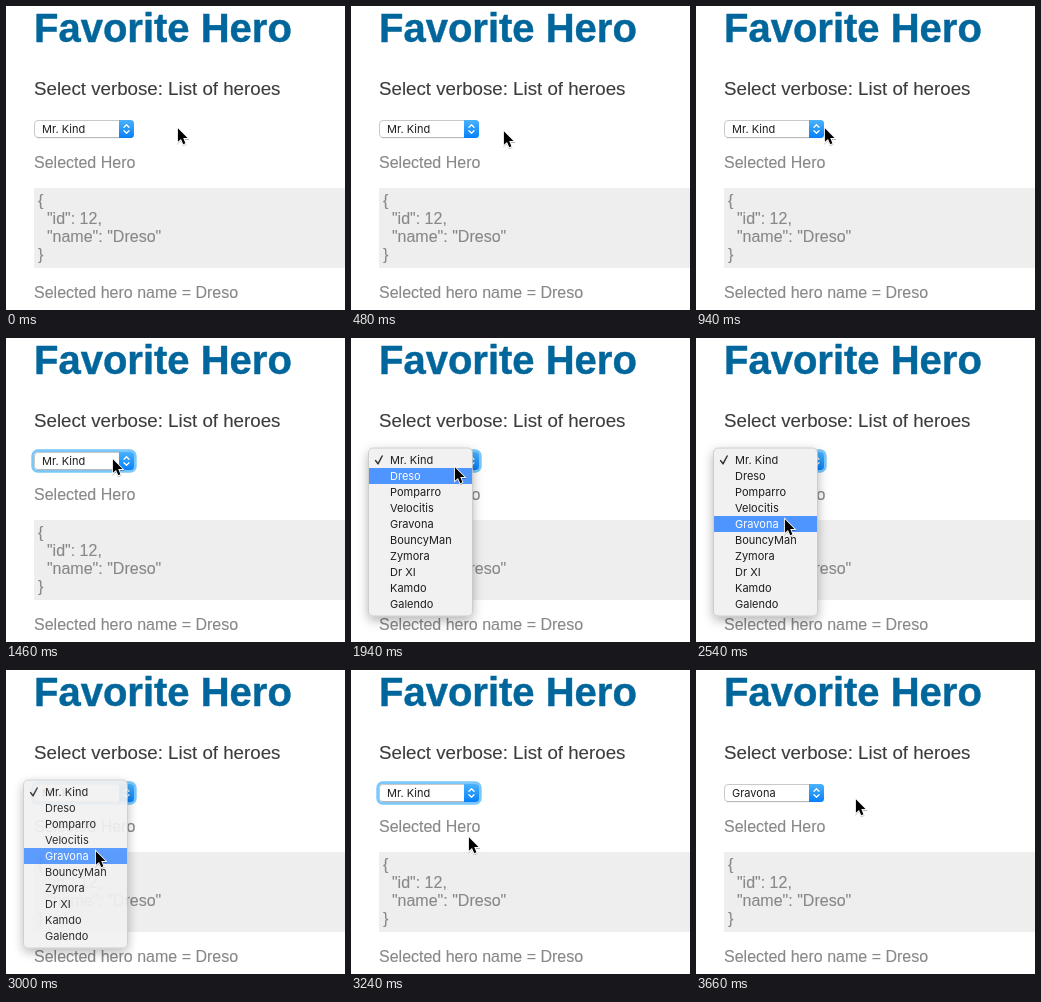
An HTML page that plays this animation: 339x304 px, repeating every 4.1 s.

```html
<!DOCTYPE html>
<html lang="en">
<head>
<meta charset="utf-8">
<title>Favorite Hero</title>
<style>
  html, body { margin: 0; width: 100%; height: 100%; overflow: hidden; background: #fff; }
  svg { display: block; width: 100%; height: 100%; }
  text { white-space: pre; }
  .page { font-family: Arial, "Liberation Sans", sans-serif; font-size: 16px; fill: #888; stroke: #888; stroke-width: .12; }
  .ui { font-family: Inter, Roboto, sans-serif; font-size: 11px; fill: #1c1c1c; }
</style>
</head>
<body>
<svg viewBox="0 0 339 304" xmlns="http://www.w3.org/2000/svg">
  <defs>
    <linearGradient id="blue" x2="0" y2="1">
      <stop offset="0" stop-color="#4ab2fc"/>
      <stop offset="1" stop-color="#0680fb"/>
    </linearGradient>
    <filter id="menuShadow" x="-30%" y="-20%" width="160%" height="140%">
      <feDropShadow dx="0" dy="4" stdDeviation="5.5" flood-opacity=".3"/>
    </filter>
    <filter id="arrowShadow" x="-30%" y="-30%" width="170%" height="170%">
      <feDropShadow dx="0" dy="1" stdDeviation=".7" flood-opacity=".3"/>
    </filter>
  </defs>
  <rect width="339" height="304" fill="#fff"/>
  <g class="page">
    <text x="28" y="36" font-size="40" font-weight="700" fill="#00669b" stroke="#00669b" stroke-width=".45">Favorite Hero</text>
    <text x="28" y="89" font-size="18.72" fill="#3c3c3c" stroke="#3c3c3c">Select verbose: List of heroes</text>
    <text x="28" y="162">Selected Hero</text>
    <rect x="28" y="182" width="311" height="80" fill="#eee" stroke="none"/>
    <text x="32" y="200">{</text>
    <text x="40.9" y="218">"id": 12,</text>
    <text x="40.9" y="236">"name": "Dreso"</text>
    <text x="32" y="254">}</text>
    <text x="28" y="292">Selected hero name = Dreso</text>
  </g>

  <rect id="ring" x="26.8" y="112.8" width="102.4" height="20.4" rx="5" fill="none" stroke="#7ac8fa" stroke-width="3"/>
  <rect x="28.5" y="114.5" width="99" height="17" rx="3.5" fill="#fff" stroke="#c9c9c9"/>
  <path d="M31 131.7H114" stroke="#b2b2b2" stroke-width=".8"/>
  <path d="M113 114H124.5A3.5 3.5 0 0 1 128 117.5V128.5A3.5 3.5 0 0 1 124.5 132H113Z" fill="url(#blue)"/>
  <path d="M118 121.3L120.5 118.8L123 121.3M118 124.8L120.5 127.3L123 124.8" fill="none" stroke="#fff" stroke-width="1.3" stroke-linecap="round" stroke-linejoin="round"/>
  <text id="value" class="ui" x="36" y="127"></text>

  <g id="menu">
    <rect x="17.5" y="110" width="104" height="168" rx="4.5" fill="#f1f1f1" stroke="#b8b8b8" stroke-width=".6" filter="url(#menuShadow)"/>
    <rect id="bar" x="18" width="103" height="16" fill="#4f95ff"/>
    <path id="check" d="M24.6 122.6L27 125.8L31.2 118" fill="none" stroke-width="1.5" stroke-linecap="round" stroke-linejoin="round"/>
    <g id="items" class="ui"></g>
  </g>

  <path id="cursor" d="M.9 1.3V14.8L4 11.9L6.3 17.2L8.4 16.3L6.2 11.1H10.5Z" fill="#000" stroke="#fff" stroke-width="1.7" paint-order="stroke" filter="url(#arrowShadow)"/>
</svg>
<script>
  const LOOP = 4100, STEP = 20, ROW = 16, TOP = 114;
  const heroes = ["Mr. Kind", "Dreso", "Pomparro", "Velocitis", "Gravona",
                  "BouncyMan", "Zymora", "Dr XI", "Kamdo", "Galendo"];
  const picked = 4;

  // time, x, y, ease-out power of the segment that ends here
  const path = [
    [0, 171, 121], [380, 171, 121], [500, 150, 124, 1.3],
    [820, 150, 124], [940, 128, 121], [1180, 106, 120, 1.6],
    [1860, 106, 120], [1940, 103, 128], [2280, 92, 168], [2400, 89, 178],
    [2540, 88, 180], [2860, 88, 180], [3000, 89, 180], [3080, 89, 180],
    [3240, 117, 166], [3380, 145, 144], [3500, 159, 128, 1.4], [LOOP, 159, 128]
  ];

  const $ = id => document.getElementById(id);
  const [ring, value, menu, bar, check, items, cursor] =
    ["ring", "value", "menu", "bar", "check", "items", "cursor"].map($);
  const show = (el, on) => el.setAttribute("visibility", on ? "visible" : "hidden");
  const within = (t, from, to) => t >= from && t < to;
  const clamp = v => Math.min(1, Math.max(0, v));

  const labels = heroes.map((name, i) => {
    const el = document.createElementNS("http://www.w3.org/2000/svg", "text");
    el.setAttribute("x", 39);
    el.setAttribute("y", TOP + 12 + ROW * i);
    el.textContent = name;
    return items.appendChild(el);
  });

  function pointer(t) {
    const i = path.findIndex(k => k[0] > t);
    const [t0, x0, y0] = path[i - 1], [t1, x1, y1, power = 1] = path[i];
    const p = 1 - (1 - (t - t0) / (t1 - t0)) ** power;
    return [x0 + (x1 - x0) * p, y0 + (y1 - y0) * p].map(Math.round);
  }

  function draw(t) {
    const [x, y] = pointer(t);
    cursor.setAttribute("transform", `translate(${x} ${y})`);

    show(ring, within(t, 1460, 3660));
    value.textContent = heroes[t < 3660 ? 0 : picked];

    menu.setAttribute("opacity", within(t, 1500, 3200) ? 1 - clamp((t - 2985) / 200) : 0);
    const blink = within(t, 2860, 2920);
    const row = blink ? -1 : t < 2400 ? Math.floor((y + 2 - TOP) / ROW) : picked;
    bar.setAttribute("y", TOP + ROW * row);
    bar.setAttribute("opacity", row < 0 ? 0 : 1);
    labels.forEach((el, i) => el.style.fill = i === row ? "#fff" : "");
    check.setAttribute("stroke", row === 0 ? "#fff" : "#333");
  }

  const start = performance.now();
  function tick(now) {
    const t = Math.max(0, now - start) % LOOP;
    draw(Math.floor(t / STEP) * STEP);
    requestAnimationFrame(tick);
  }
  draw(0);
  requestAnimationFrame(tick);
</script>
</body>
</html>
```
